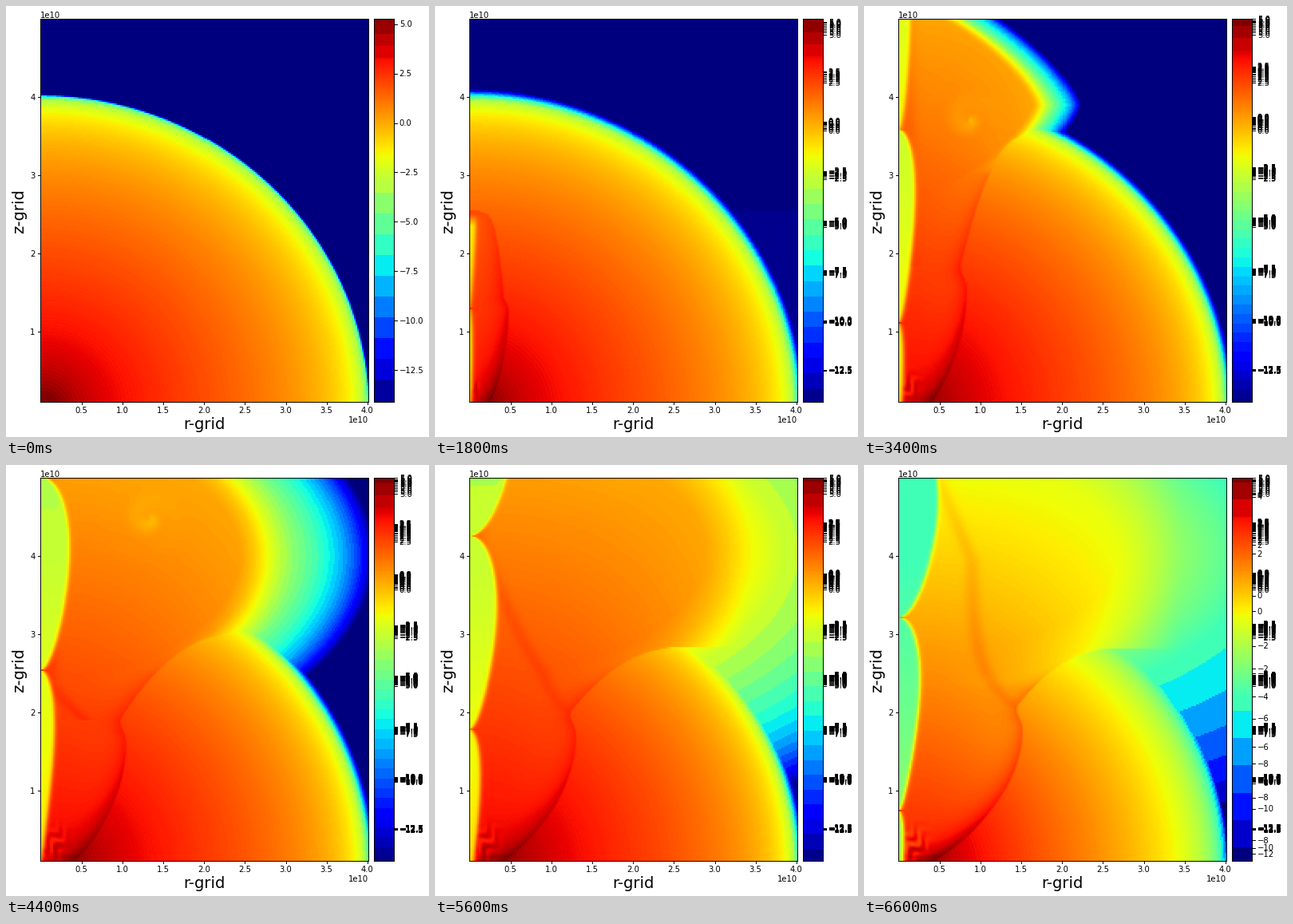
A matplotlib script that plays this animation: 530 px wide and 540 px high, repeating every 6.8 s.

```python
import numpy as np
import matplotlib.pyplot as plt
from matplotlib.animation import FuncAnimation

W, H, DPI = 530, 540, 100
FRAMES, STEP = 34, 200
LEFT, RIGHT, TOP, BOTTOM = 43.3, 453.6, 16.3, 495.6
BAR_L, BAR_R = 460.5, 486
ORIGIN_Y, UNIT_X, UNIT_Y = 505.9, 102.4, 98
BREAKOUT = 14
FLOOR = -14.1

plt.rcParams["font.family"] = "DejaVu Sans"

NX, NY = 205, 240
xs = (np.arange(NX) + .5) * (RIGHT - LEFT) / NX
ys = TOP + (np.arange(NY) + .5) * (BOTTOM - TOP) / NY
X, Y = np.meshgrid(xs, ys)
Z = (ORIGIN_Y - Y) / UNIT_Y
R = np.hypot(X / UNIT_X, Z)


def unit(v):
    return np.clip(v, 0, 1)


def mix(a, b, t):
    return a + (b - a) * t


def limits(k):
    low = FLOOR + 1.8 * max(0, k - 30)
    high = 5.26 if k == 0 else 4.6 + 1.35 * np.exp(-k / 10)
    return low, high


def posterise(v, k):
    """Coarse colour steps in the thin gas."""
    step = .75 + .3 * np.cos(2 * np.pi * k / 38)
    return np.where(v < -3, np.round((v + 3) / step) * step - 3, v)


def star(k):
    v = 2 + 2.8 * np.log10(np.clip(4 / (R + .06) - .985, .003, None))
    v = v + .2 * np.exp(-R / .7) * np.sin(2 * np.pi * R / .045)
    slope = 300 if k == 0 else 90
    return np.where(R < 4, v, -5.2 - (R - 4) * slope)


def neck(k):
    """Waist of the cocoon, in pixels right of the axis and down the stage."""
    head = ORIGIN_Y - 27.8 * k
    return 3.7 + 4.37 * k, max(351 - 1.45 * k, mix(head, 496, .45))


def front(k):
    """Cocoon radius per row, with the place where it meets the star surface."""
    touch = 270 * (1 - np.exp(-max(k - BREAKOUT, 0) / 3.3))
    surface = ORIGIN_Y - UNIT_Y * np.sqrt(3.85 ** 2 - (touch / UNIT_X) ** 2)
    top = max(ORIGIN_Y - 27.8 * k, surface)

    nx, ny = neck(k)
    foot, bulge = min(2.8 * k, 40), nx + min(8, .7 * k)
    bulge_y = ny + min(28, 1.6 * k)
    rise = unit((496 - ys) / (496 - bulge_y))
    lower = mix(foot, bulge, np.sin(np.pi / 2 * rise) ** .75)
    turn = unit((bulge_y - ys) / (bulge_y - ny))
    lower = mix(lower, nx, turn * turn * (3 - 2 * turn))

    t = unit((ny - ys) / (ny - top))
    bend = .2 if touch < nx else .47
    upper = mix(nx, touch, 1 - (1 - t) ** bend)
    edge = np.pad(np.where(ys > ny, lower, upper), 2, mode="edge")
    return np.convolve(edge, np.ones(5) / 5, "valid"), touch, top


def cloud(k):
    """Gas thrown out above the star: its value and depth into the halo."""
    age = k - BREAKOUT
    if age < 0:
        return np.full_like(X, FLOOR), np.ones_like(X)
    size = min(1, (age + .5) / 3)
    rx = (130 + 31 * age + .63 * age ** 2) * size
    ry = (115 + 17.5 * age) * size
    power = min(2, 1 + .12 * age)
    centre = max(110, 130 - 2 * age)
    core = .82 - .028 * age
    rho = ((X / rx) ** power + (np.abs(Y - centre) / ry) ** power) ** (1 / power)
    h = (rho - core) / (1 - core)
    d = unit(h)
    return -.6 - 9.3 * d - 4.3 * d ** 6, h


def add_jet(v, k, top, inside):
    """Chain of lenses along the axis, pinched at rising nodes."""
    nodes = 155 + 242 * np.arange(-1, 5) - 28 * (k - 17)
    grow = max(.35, 1.45 * (1 - np.exp(-(k / 16) ** 1.5)))
    for j, (a, b) in enumerate(zip(nodes[:-1], nodes[1:])):
        u = unit((Y - a) / (b - a))
        lens = 2 * u ** .5 * (1 - u) ** .5
        width = (5 + .07 * (496 - Y)) * lens * grow
        value = -1.5 - .38 * Z
        if j == 0:
            value = value + 1
            width = width * (.4 if k > BREAKOUT else .8)
        mask = 1 / (1 + np.exp(np.clip((X - width) / 1.5, -30, 30)))
        mask = mask * (width > 1) * inside
        if k < BREAKOUT:
            mask = mask * unit((Y - top - 6) / 14)
        v = mix(v, value, mask)
    return v


def cocoon_base(k):
    v = 3.1 - .65 * Z
    shown = unit((k - 12) / 5)

    # ridge rising from the neck and carried up with the flow
    nx, ny = neck(k)
    line = nx * (.62 + .38 * np.exp(-np.clip(ny - Y, 0, None) / 40))
    line = line - .4 * np.clip(260 - 28 * (k - 28) - Y, 0, None)
    v = v + .4 * shown * np.exp(-((X - np.maximum(line, 12)) / 10) ** 2) * (Y < ny)

    # drifting vortex
    dx, dy = X - (89 + 9.6 * (k - 17)), Y - (143 - 15 * (k - 17))
    d = np.hypot(dx, dy)
    swirl = 1 + .5 * np.cos(np.arctan2(dy, dx) - d / 6)
    v = v - .9 * shown * np.exp(-d / 15) * swirl

    # stirred gas at the foot of the jet
    size = np.clip(k / 20, .3, 1.2)
    foot = np.exp(-((X - 17 * size) / (13 * size)) ** 2
                  - ((Y - 478) / (17 * size)) ** 2)
    return v + .8 * foot * np.sin(.3 * X + .25 * Y + 2 * np.sin(.15 * Y - .2 * X + k))


def field(k):
    shell = star(k)
    haze, h = cloud(k)
    outer = np.maximum(shell, haze)
    if k == 0:
        return outer
    edge, touch, top = front(k)
    slope = np.clip(np.gradient(edge, ys), -3, 3)
    dist = (edge[:, None] - X) / np.sqrt(1 + slope ** 2)[:, None]
    below = Y >= top
    broken = k >= BREAKOUT

    base = cocoon_base(k)
    inner = base
    if broken:
        fade = unit(1 - (X / max(touch, 1.3 * edge.max())) ** 2)
        inner = mix(np.maximum(haze, -1.5), base, fade)
    inner = mix(inner, shell + .7, np.exp(-np.clip(dist, 0, None) / 13))
    above = shell
    if broken:
        above = mix(haze, np.maximum(base, haze), fade * unit(1.3 - 3 * h))
        inner = mix(above, inner, unit((Y - top) / 50))
        above = np.maximum(shell, above)

    cover = unit(dist / 3 + .5)
    v = np.where(below, mix(outer, inner, cover), above)
    inside = np.where(below, cover, (h < .5) * 1.0)
    return add_jet(v, k, top, inside)


fig = plt.figure(figsize=(W / DPI, H / DPI), dpi=DPI, facecolor="white")


def panel(x0, x1, shape):
    ax = fig.add_axes([x0 / W, 1 - BOTTOM / H, (x1 - x0) / W, (BOTTOM - TOP) / H])
    picture = ax.imshow(np.zeros(shape), cmap="jet", aspect="auto",
                        interpolation="nearest")
    ax.set_xticks([])
    ax.set_yticks([])
    for side in ax.spines.values():
        side.set_linewidth(.7)
    return picture


image = panel(LEFT, RIGHT, (NY, NX))
bar = panel(BAR_L, BAR_R, (480, 1))

over = fig.add_axes([0, 0, 1, 1])
over.set_xlim(0, W)
over.set_ylim(H, 0)
over.axis("off")


def text(x, y, s, px=10, ha="center"):
    """Text whose digits are centred on y."""
    return over.text(x, y + .37 * px, s, fontsize=px * 72 / DPI,
                     ha=ha, va="baseline")


def tick(x, y, dx, dy):
    return over.plot([x, x + dx], [y, y + dy], color="black", lw=.7)[0]


for i in range(1, 9):
    x = LEFT + i * UNIT_X / 2
    tick(x, BOTTOM, 0, 3.5)
    text(x, 506.3, f"{i / 2:.1f}")
for i in range(1, 5):
    y = ORIGIN_Y - UNIT_Y * i
    tick(LEFT, y, -3.5, 0)
    text(36.5, y, str(i), ha="right")
text(43, 11, "1e10", ha="left")
text(454, 518, "1e10", ha="right")
text(248.5, 522.3, "r-grid", 19.5)
over.text(16.3, 257, "z-grid", fontsize=19.5 * 72 / DPI, rotation=90,
          ha="center", va="center")


def bar_marks(k):
    low, high = limits(k)
    gap = 2 if k > 30 else 2.5
    marks = []
    for n in range(int(np.ceil(low / gap)), int(np.floor(high / gap)) + 1):
        y = mix(TOP, BOTTOM, (high - n * gap) / (high - low))
        label = str(n * gap).replace("-", "\u2212")
        marks += [tick(BAR_R, y, 3.5, 0), text(492.7, y, label, ha="left")]
    return marks


# Scale labels pile up because older ones are never cleared.
marks = [bar_marks(k) for k in range(FRAMES)]


def draw(k):
    low, high = limits(k)
    scale = np.linspace(high, low, 480)[:, None]
    scale = np.where(scale > 3.3, np.round(scale / .6) * .6, scale)
    for picture, values in ((image, field(k)), (bar, scale)):
        picture.set_data(posterise(values, k))
        picture.set_clim(low, high)
    for i, group in enumerate(marks):
        for mark in group:
            mark.set_visible(i <= k)
    return [image, bar]


anim = FuncAnimation(fig, draw, frames=FRAMES, interval=STEP,
                     repeat=True, repeat_delay=0, blit=False)
plt.show()
```
